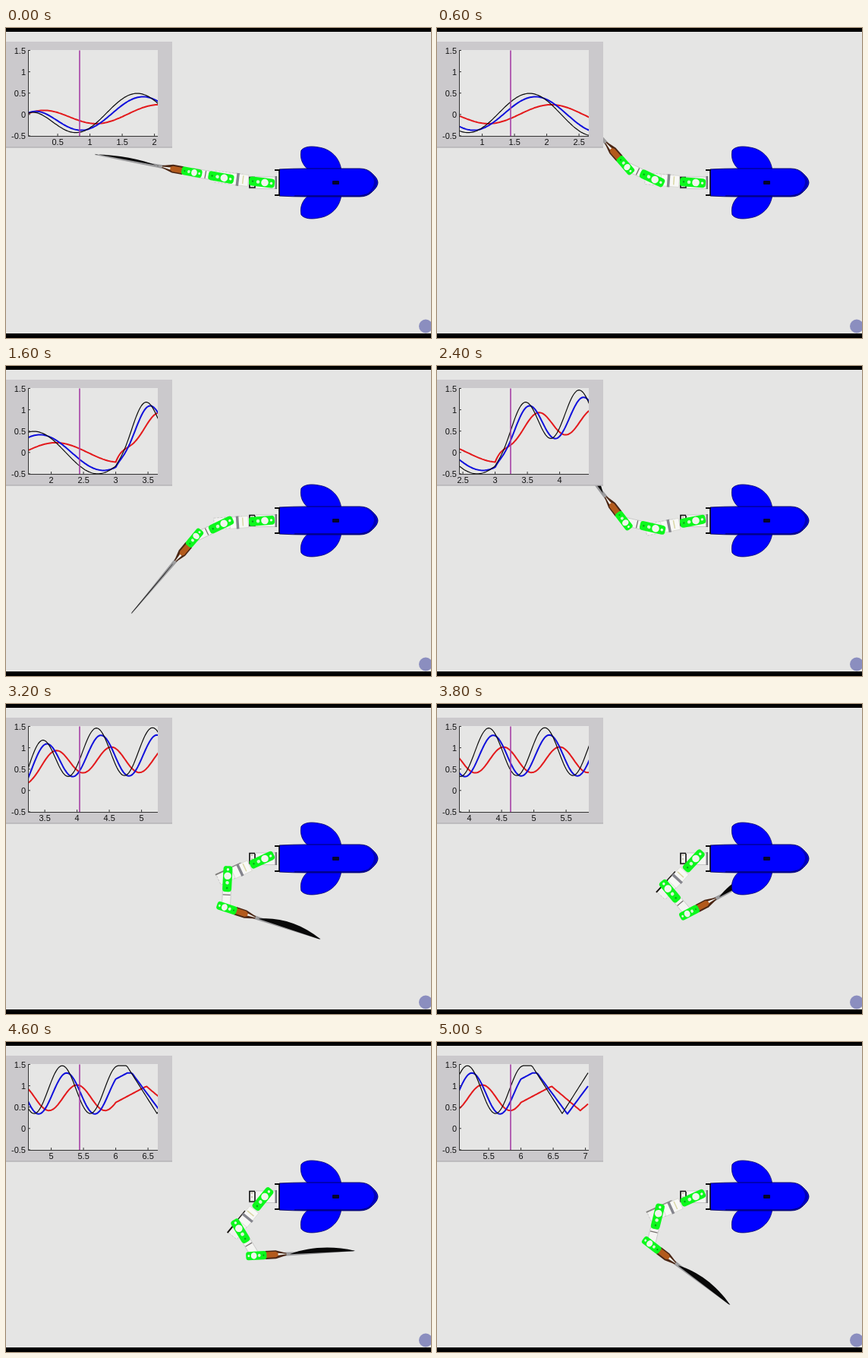
Write an HTML page that moves like this. It is 560 px wide and 408 px high and loops after 5.2 s.

```html
<!DOCTYPE html>
<html lang="en">
<head>
<meta charset="utf-8">
<title>Robotic fish tail</title>
<style>
  html, body { margin: 0; width: 100%; height: 100%; overflow: hidden; background: #e5e5e4; }
  svg { display: block; width: 560px; height: 408px; }
  text { font: 11px "Liberation Sans", Arial, sans-serif; fill: #111; }
  .curve { fill: none; stroke-linejoin: round; }
  .end { text-anchor: end; }
  .mid { text-anchor: middle; }
</style>
</head>
<body>
<svg viewBox="0 0 560 408">
  <defs>
    <clipPath id="window"><rect x="29" y="29" width="171" height="114"/></clipPath>
    <g id="plate">
      <rect x="-21" y="-6" width="34" height="12" rx="4" fill="#0cf81c"/>
      <circle r="4.800" fill="#f2f5ee"/>
      <circle cx="8.500" r="1.700" fill="#e8f5e4"/>
      <circle cx="-9" r="2.300" fill="#d9f5d5"/>
      <circle cx="-16" r="1.200" fill="#0a9c18"/>
    </g>
  </defs>
  <rect width="560" height="408" fill="#e5e5e4"/>

  <g id="bracket">
    <rect x="320.500" y="196" width="38" height="15.500" fill="#f4f4f2" stroke="#b9b9b9" stroke-width=".7"/>
    <path d="M328 196.500H321V210H328V197" fill="none" stroke="#111" stroke-width="1.600"/>
    <path d="M324 198V208" stroke="#a59b72" stroke-dasharray="2 3"/>
    <path d="M356 195V212" stroke="#77777c" stroke-width="3"/>
  </g>

  <g id="link1">
    <rect x="-67" y="-8" width="37" height="15" fill="#f1f1ef" stroke="#bdbdbd" stroke-width=".7" stroke-dasharray="3 1.500"/>
    <path id="rim" d="M-68-8H-31" stroke="#17130f" stroke-width="2"/>
    <rect x="-46" y="-7.500" width="24" height="15" fill="#f8f8f6" stroke="#cfcfc8" stroke-width=".6"/>
    <path d="M-36-8.500V8.500" stroke="#85858d" stroke-width="3.500"/>
    <path d="M-29-6V5" stroke="#d8d6a5" stroke-width="1.500"/>
    <use href="#plate"/>
    <g id="link2">
      <rect x="-42" y="-5.500" width="22" height="11" fill="#f4f4f2" stroke="#b7b7b7" stroke-width=".6"/>
      <path d="M-25-5V5" stroke="#77706f" stroke-width="1.300"/>
      <use href="#plate"/>
      <g id="link3">
        <path id="stalk" fill="#9b9b9d"/>
        <path id="blade" fill="#080808"/>
        <path d="M-13-5.500H-27L-41-1.500V1.500L-27 5.500H-13Z" fill="#4a2614"/>
        <path d="M-14-3.500H-27L-33 0L-27 4H-14Z" fill="#b35a1c"/>
        <path d="M-30-1L-43 0L-30 2Z" fill="#efefeb"/>
        <use href="#plate" transform="translate(2 0) scale(.8 .92)"/>
      </g>
    </g>
  </g>

  <g id="body">
    <path id="fin" d="M399 187C390 180 387 171 389 161C393 156 402 155 412 157C427 159 440 170 442 188Z" fill="#00f" stroke="#00006c" stroke-width=".8"/>
    <use href="#fin" transform="matrix(1 0 0 -1 0 407)"/>
    <path d="M360 186Q378 185 395 185H466Q476 185 482 191Q490 198 490 203.500T482 216Q476 222 466 222H395Q378 222 360 221Z" fill="#00f" stroke="#00005c" stroke-width=".9"/>
    <path d="M380 221H466Q476 220 482 215" fill="none" stroke="#00007c" stroke-width="1.500"/>
    <path d="M474 187Q489 195 489 203.500T474 220Q484 212 485 203.500T474 187Z" fill="#0000b8"/>
    <rect x="430" y="201" width="9" height="5" rx="1" fill="#05052e"/>
    <path d="M354 187H361M354 220H361" stroke="#0b0b0b" stroke-width="2"/>
    <path d="M360 188V219" stroke="#10101c" stroke-width="1.500"/>
    <path d="M358 191V217" stroke="#f7f7f7" stroke-width="1.500"/>
  </g>

  <g id="plot">
    <rect y="18" width="219" height="139.500" fill="#cbc9cc"/>
    <path d="M0 157H219" stroke="#aaa8ab"/>
    <rect x="29" y="29" width="171" height="113" fill="#e6e6e5"/>
    <g clip-path="url(#window)"><g id="curves"></g></g>
    <path d="M97 29.500V142" stroke="#a63fa6" stroke-width="1.600"/>
    <path d="M29.500 29V142.500H200" fill="none" stroke="#333"/>
    <g id="yTicks"></g>
    <g id="xTicks"></g>
  </g>

  <circle cx="553" cy="392.500" r="9" fill="#8b8ebf"/>
  <rect width="560" height="5"/>
  <rect y="402" width="560" height="6"/>
</svg>
<script>
const LOOP = 5200, STEP = 200;
const PX = 85, PY = 56.2, LEFT = 29, ZERO = 113.8;
const SLOW_HALF = .99, FAST_PERIOD = .87, RAMP_HALF = .47;
const FAST_START = 3, FAST_END = 6;

const $ = id => document.getElementById(id);
const clamp = x => Math.min(1, Math.max(0, x));
const settle = (t, rate) => 1 - Math.exp(-rate * t);

// Each signal swings slowly, then fast about a raised mean, and ends in straight ramps.
const signals = [
  { color: '#e3191c', width: 2, sway: .23, trough: 1.08, mean: .72, amp: .3, peak: 3.66, lastTrough: 6.92 },
  { color: '#1010dc', width: 2, sway: .42, trough: .83, mean: .82, amp: .48, peak: 3.5, lastTrough: 6.72 },
  { color: '#0c0c0c', width: 1.2, sway: .5, trough: .74, mean: .91, amp: .56, peak: 3.43, lastTrough: 6.64 }
];

const slow = (s, t) => -s.sway * settle(t, 2.5) * Math.cos(Math.PI * (t - s.trough) / SLOW_HALF);
const fast = (s, t) => s.mean + s.amp * Math.cos(2 * Math.PI * (t - s.peak) / FAST_PERIOD);

function signal(s, t) {
  if (t < FAST_START) return slow(s, t);
  if (t < FAST_END) {
    const from = slow(s, FAST_START);
    return from + (fast(s, t) - from) * settle(t - FAST_START, 4);
  }
  const climb = fast(s, FAST_END) + .8 * (t - FAST_END);
  const ramp = s.mean - s.amp + 2 * s.amp * Math.abs(t - s.lastTrough) / RAMP_HALF;
  return Math.min(climb, ramp, s.mean + s.amp);
}

// The red wave runs down the tail: each joint repeats it later and stronger.
const joints = [
  { pivot: '341 203.5', gain: 45, delay: 0, bias: .12 },
  { pivot: '-54 0', gain: 110, delay: .2, bias: -.2 },
  { pivot: '-42 0', gain: 115, delay: .25, bias: -.2 }
];
const swing = t => clamp((t - FAST_START) / .4);
const bend = (j, t) => j.gain * (signal(signals[0], t - j.delay) + j.bias * swing(t));

$('curves').innerHTML = signals.map(s => {
  const points = Array.from({ length: 351 }, (_, i) => {
    const t = .04 + i * .02;
    return `${(t * PX).toFixed(1)},${(ZERO - signal(s, t) * PY).toFixed(1)}`;
  });
  return `<polyline class="curve" stroke="${s.color}" stroke-width="${s.width}" points="${points.join(' ')}"/>`;
}).join('');

$('yTicks').innerHTML = [-.5, 0, .5, 1, 1.5].map(v => {
  const y = ZERO - v * PY;
  return `<path d="M29 ${y}h3" stroke="#333"/><text class="end" x="26" y="${y + 4}">${v}</text>`;
}).join('');

const ticks = Array.from({ length: 14 }, (_, i) => (i + 1) / 2);
$('xTicks').innerHTML = ticks.map(v =>
  `<g><path d="M0 142v-3" stroke="#333"/><text class="mid" y="154">${v}</text></g>`).join('');

function draw(now) {
  const cursor = .84 + Math.floor(now % LOOP / STEP) * STEP / 1000;
  const toX = t => LEFT + (t - cursor + .8) * PX;

  $('curves').setAttribute('transform', `translate(${toX(0)} 0)`);
  [...$('xTicks').children].forEach((tick, i) => {
    const x = toX(ticks[i]);
    tick.setAttribute('transform', `translate(${x} 0)`);
    tick.setAttribute('visibility', x >= LEFT && x <= 199.5 ? 'visible' : 'hidden');
  });

  const angles = joints.map(j => bend(j, cursor));
  joints.forEach((j, i) =>
    $('link' + (i + 1)).setAttribute('transform', `translate(${j.pivot}) rotate(${-angles[i]})`));
  $('rim').setAttribute('opacity', clamp((angles[0] - 18) / 15));

  // The blade rolls with the last joint and looks shorter when seen edge-on.
  const roll = (angles[2] - 22) / 5;
  const edgeOn = swing(cursor) * Math.max(0, 1 - Math.abs(roll) / 3);
  const tip = -131 + 55 * edgeOn;
  $('stalk').setAttribute('d', `M-38-2.500L${tip}-.6V.6L-38 2.500Z`);
  $('blade').setAttribute('d',
    `M-46 0C-70 ${roll} ${tip + 30} ${roll * 1.1} ${tip} 0L${tip + 2}-.6L-46-.4Z`);
  requestAnimationFrame(draw);
}
draw(0);
</script>
</body>
</html>
```
